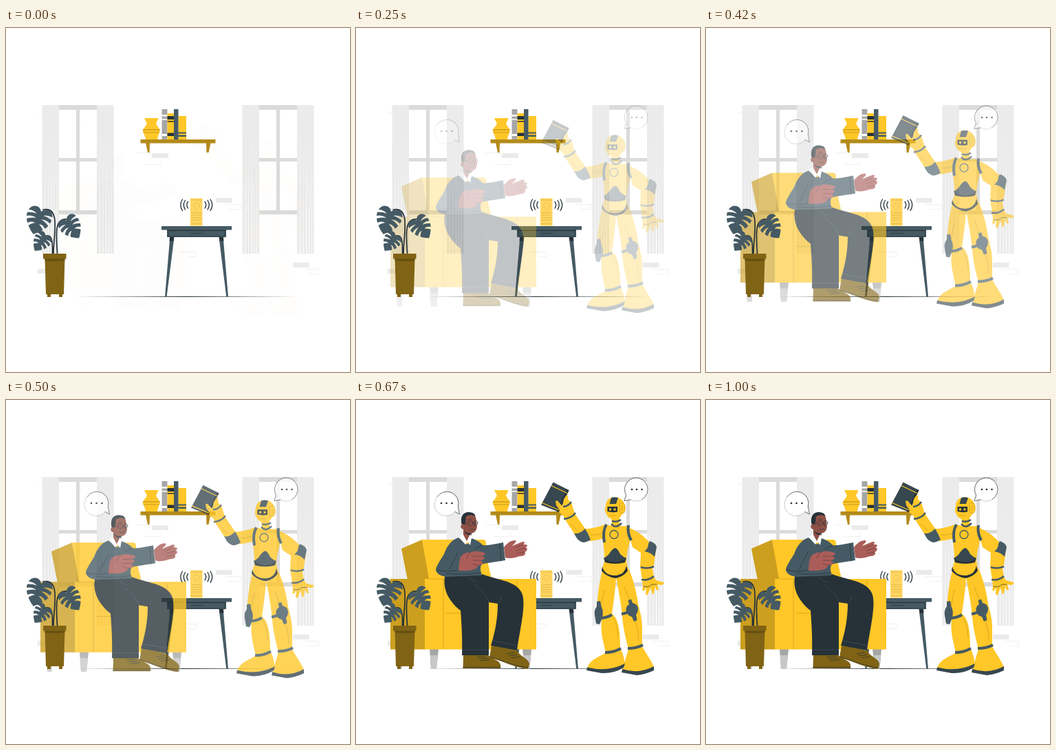
An HTML page that plays this animation: 500 by 500 pixels, repeating every 1.04 s.

```html
<!DOCTYPE html>
<html lang="en">
<head>
<meta charset="utf-8">
<title>Living room</title>
<style>
html, body { margin: 0; width: 100%; height: 100%; overflow: hidden; background: #fff }
svg { display: block; width: 100vw; height: 100vh }
.y { fill: #ffc727 } .y2 { fill: #cc9f1f } .y3 { fill: #b38b1b } .y4 { fill: #806314 }
.d { fill: #455a64 } .d2 { fill: #37474f } .k { fill: #263238 } .s { fill: #8f5145 } .s2 { fill: #aa5d59 }
.w { fill: #fff } .g { fill: #dbdbdb } .g2 { fill: #ebebeb } .g3 { fill: #a6a6a6 } .g4 { fill: #c7c7c7 }
.l { fill: none; stroke: #263238; stroke-width: .7; stroke-linecap: round; stroke-linejoin: round }
.f { fill: none; stroke: #ebebeb; stroke-width: .7 }
.o { fill: none; stroke: #b38b1b; stroke-width: .5 }
.b { fill: none; stroke: #455a64; stroke-width: 4 }
.b2 { fill: none; stroke: #455a64; stroke-width: 2.5 }
.m { fill: none; stroke: #5d3029; stroke-width: .6; stroke-linecap: round }
</style>
</head>
<body>
<svg viewBox="0 0 500 500">
<defs>
  <g id="curtain">
    <path class="g2" d="M0 0H24.500V216H0Z"/>
    <path class="w" d="M4 216L4.600 30 5 216ZM8.500 216L9 45 9.500 216ZM13 216L13.700 25 14.200 216ZM17 216L17.500 50 18 216ZM20.500 216L21 35 21.400 216Z"/>
  </g>
  <g id="window">
    <path class="g" d="M77 112H132V119H77ZM102 119H107V265H102ZM77 189H132V194H77ZM77 265H132V271H77Z"/>
    <use href="#curtain" x="52.500" y="112"/><use href="#curtain" x="132" y="112"/>
  </g>
  <mask id="slots" maskUnits="userSpaceOnUse" x="-25" y="-15" width="50" height="60">
    <path fill="#fff" d="M-25 -15H25V45H-25Z"/>
    <path d="M-24 5Q-13 0 -5 5Q-13 4 -24 10ZM-24 17Q-12 8 -4 12Q-12 13 -22 22ZM-18 29Q-10 17 -3 20Q-9 22 -14 32ZM24 5Q13 0 5 5Q13 4 24 10ZM24 17Q12 8 4 12Q12 13 22 22ZM18 29Q10 17 3 20Q9 22 14 32Z"/>
  </mask>
  <g id="leaf" mask="url(#slots)">
    <path class="d" d="M0 0C-4 -10 -18 -8 -19 6C-20 20 -8 32 0 38C10 30 20 20 19 5C18 -8 5 -9 0 0Z"/>
  </g>
</defs>

<!-- room -->
<use href="#window"/><use href="#window" x="291"/>
<path class="g2" d="M212 182h24v7h-24zM305 247h23.500v7h-23.500zM417 341h23.500v7h-23.500zM46 350h24v7h-24z"/>
<path class="f" d="M188 181.500h21v6M200 198.500h24v-6M318 256.500h24v7h-18M431 350.500h23.500v7h-15M252 325.500h24.500v7h-12M47 122.500h6"/>
<path class="k" d="M100 390.500Q262 389.700 424 390.500Q262 391.400 100 390.500Z"/>

<!-- shelf -->
<path class="y3" d="M195.500 162H304.500V167.500H195.500ZM203 167H209L208.500 181H206ZM291 167H297.500L294.500 181H291.500Z"/>
<path class="y" d="M201 131H221.500C220 136 217.500 138 218.500 140L224 148.500C223 153 220.500 157 220 162H203C202.500 157 199.500 153 198.500 148.500L204.500 140C205.500 138 203 136 201 131Z"/>
<path class="y3" d="M199 147.500H224V148.500H199ZM199.500 151.500H223V152.300H199.500Z"/>
<path class="g3" d="M226.500 118H234.500V162H226.500Z"/>
<path class="w" d="M226.500 126H234.500V128.500H226.500ZM226.500 132H234.500V133.500H226.500ZM226.500 154H234.500V157H226.500Z"/>
<path class="y" d="M234.500 124H244V162H234.500ZM250.500 128H262V162H250.500Z"/>
<path class="k" d="M234.500 128H244V133H234.500ZM234.500 135H244V136.500H234.500ZM234.500 152.500H244V157H234.500Z"/>
<path class="d" d="M244 118H250.500V162H244ZM250.500 151.500H262V153.500H250.500ZM250.500 155.500H262V158H250.500Z"/>

<!-- table and speaker -->
<path class="d" d="M226 288H328V293.500H226ZM234 294H320V304H234ZM238 308H244L233.500 391H231ZM310 308H316L323 391H320.300Z"/>
<path class="k" d="M234 293.200H320V295H234ZM238 304H244.500L243.500 309.500H237.500ZM309.500 304H316L316.500 309.500H310.500Z"/>
<path class="l" d="M236 296V303H318V296M269 298.500H286"/>
<path fill="#ffd561" d="M268 247.500H285.500V287.500H268Z"/>
<g class="o" opacity=".65"><path d="M268 250H285.500M268 284.500H285.500"/><circle cx="276.800" cy="258.500" r="4.300" stroke-dasharray="1 .6"/>
<path style="stroke-width:1.200" stroke-dasharray="1.200 1.200" d="M270 268.500H284M270 272H284M270 275.500H284M270 279H284"/></g>
<g class="l" style="stroke-width:1.300"><path d="M264.500 252.500Q261 257 264.500 262M260.500 250.500Q256 257 260.500 264M256.500 249Q251 257 256.500 265.500"/>
<path d="M289 252.500Q292.500 257 289 262M293 250.500Q297.500 257 293 264M297 249Q302.500 257 297 265.500"/></g>

<!-- fading figures -->
<g id="people">
  <!-- armchair -->
  <path class="g3" d="M58 362H68L66.500 390.500H60ZM107 362H120L117 390.500H109ZM242 362H255L252.500 390.500H245Z"/>
  <path class="g4" d="M59 371H67.500L66.500 390.500H60ZM108 371H119L117 390.500H109ZM243 371H254L252.500 390.500H245Z"/>
  <path class="y2" d="M66 216L96 203 108 262H75ZM50 260H102V362.500H50Z"/>
  <path class="y" d="M96 203H186Q189 204 189 208L191 234 197 260H262V362.500H100V260H106Z"/>
  <path class="o" d="M127 261V362M234 261V362M131 310H155M106 260H132"/>

  <!-- man -->
  <path class="y4" d="M156 370H191C196 376 209 378 210 385V390H155.500ZM197 357L234 364C238 373 252 376 252 384L250 391C234 390 214 380 194 374Z"/>
  <path class="l" d="M155.500 388.500H210M194 373C214 379 234 388 250.500 389M176 373L189 373M178 376L192 375.500M181 379L195 377.500M219 369L230 367M222 372L234 370M226 375L238 373"/>
  <path class="k" d="M130 253H183C205 262 235 262 242 283C247 300 238 335 234 364L196 357C203 335 206 315 206 296L193 294V371H154C155 345 153 320 152 306C136 294 124 274 130 253Z"/>
  <path fill="none" stroke="#455a64" stroke-width=".6" d="M206 296C209 293 211 290 211 286M193 294C190 282 180 275 172 268M155 363H193M199 350L236 357M163 257Q168 262 176 265"/>
  <path class="s" d="M154 181C152 176 153 170 157 167H172C175 170 175 177 176 184C175 190 173 193 168 193.500L167 199 161 207 156 198V188C152 187 151 183 154 181Z"/>
  <path class="k" d="M154 182C151 172 154 163.500 163 163C169 163 173 165 173.500 169C168 166 163 167 159.500 169.500C160 174 159 178 157.500 182C156 179 154 180 154 182ZM157 190Q161 194.500 168 193.500L167 196Q160 197 157 190Z"/>
  <g class="l"><circle cx="166" cy="179" r="3.700"/><circle cx="174" cy="178.500" r="2.900"/><path d="M157 179L162.300 179M163.500 173.500L168 173M166 178.500V179.500M173.500 178V179M165 188Q169 189.500 172 187M171 179L172.500 183.500"/></g>
  <path class="d" d="M149 200C139 203 132 212 128 224C121 235 116 243 116 247C117 253 124 256 131 257L183 255C180 247 180 239 185 238L217 233 214 207C203 209 192 212 184 211C180 206 176 204 168 201L162 210Z"/>
  <path class="w" d="M155 194L150 200 159 210 162 206 166 211 168 200 166 195 161 205Z"/>
  <path class="l" d="M148 221C144 231 138 238 136 246M184 211C180 213 176 214 173 216M185 238C181 237 178 235 176 233M118 247C128 250 140 249 150 247M209 208.500L211 234M131 252Q155 255 182 251"/>
  <path class="s2" d="M152 228C157 222 162 221 166 222C172 218 180 220 187 222C189 224 187 227 180 227L186 228C188 231 185 233 180 233L184 235C186 238 183 240 178 240C176 246 168 248 160 248H149C149 240 150 234 152 228ZM215 214C220 208 224 204 232 204C234 207 229 209 227 212L242 206C246 206 246 208 243 210L247 210C250 211 249 213 246 215L248 215C250 217 248 220 245 221L246 222C247 225 243 227 238 227C230 230 222 231 217 229Z"/>
  <path class="m" d="M166 222Q162 225 161 230M180 227H170M180 233H170M178 240Q173 240 170 238M243 210L231 215M246 215L233 219M245 221L234 223"/>

  <!-- robot legs -->
  <path class="y" d="M358 247L378 257C377 278 374 296 372 311C380 316 384 330 384 362L363 367C359 350 355 337 357 318L350 304C351 283 354 264 358 247ZM378 257L396 245C403 260 408 280 410 296C412 306 416 316 416 330V358L396 362C392 347 388 330 387 315C385 292 381 275 378 257Z"/>
  <path class="b" d="M357 317Q366 316 372 312M386 311Q394 310 400 305"/>
  <path class="d" d="M350 293L355 292 356.500 300Q361 309 357 319L354 326 349 325 347.500 316Q345 306 350 300ZM395.500 291L400 289.500 402 295Q409 296 410 303Q410 309 407 312L408.500 320 404 322 401 315Q392 313 392.500 304Q393 299 397 297Z"/>
  <path class="y" d="M363 367L385 363C389 370 391 380 390 386C374 393 356 393 336 390C340 376 354 374 363 367ZM396 362L416 358C421 368 429 378 433 388L409 397 387 393Q392 375 396 362Z"/>
  <path class="d2" d="M336 388.500Q366 396 391 383L389 389Q374 398 357 397L335 393ZM387 391Q411 399 433 387V393Q420 399 408 400L386 396Z"/>
  <path class="b" d="M362 367Q375 367 385 361M395 361Q408 361 417 356"/>
  <path class="o" d="M372 315Q380 324 381 345M361 276L356 300M390 272L398 292M406 320Q411 335 411 350"/>

  <!-- robot torso -->
  <path class="y" d="M361 181Q377 184 395 183L400 195C397 212 393 222 393 235L396 247 383 256H371L357 247 361 235C362 220 358 205 358 195Z"/>
  <path class="k" d="M360 229Q377 241 393 229L391 236Q377 240 362 236ZM358 242Q361 254 374 255H379Q391 253 393 241L395 248Q391 254 384 257L378 259 372 258Q361 254 357 248Z"/>
  <path class="d2" d="M377 215Q381 217 384 224Q388 228 393 230Q377 241 360 230Q367 226 369 222Q373 216 377 215Z"/>
  <circle cx="375" cy="195.500" r="6" class="b" style="stroke-width:1.300"/>
  <path class="y" d="M371 171H383V181Q378 187 372 181Z"/>
  <path class="b2" d="M372 176Q380 178 385 174M371 180Q377 188 386 179"/>

  <!-- robot head -->
  <path class="y" d="M363 154C363 145 369 141.500 376 141.500C385 141.500 391 147 391 157Q391 164 386 167C384 172 379 174.500 375 174.500Q366 172 364 166Q360 160 363 154Z"/>
  <path class="d2" d="M371 142Q376 140.500 381 142L378 151H368.500Z"/>
  <path class="k" d="M365.500 155H380V162.500Q372 164 365.500 162Z"/>
  <path class="y" d="M368 157.500h3v3h-3zM374.500 157.500h3v3h-3z"/>
  <ellipse cx="387" cy="157" rx="4.700" ry="7" class="y"/>
  <path class="o" d="M383 151Q387 147 391 152V163Q386 167 383 162ZM387 153V161M368 168H378"/>

  <!-- raised arm with book -->
  <path class="d2" d="M286.500 119.500L309.500 131 295 163 269 152.500Z"/>
  <path class="k" d="M309.500 131L295 163 292 162 306 130Z"/>
  <path class="o" style="stroke:#ffc727;stroke-width:1.100" d="M270.500 149.500L295 160M284 124.500L307 135.500"/>
  <path class="y" d="M300 154L313 149 318 165 333 187Q342 188 362 181L361 201Q343 206 328 205L317 194 302 171Z"/>
  <path class="y" d="M290 147Q293 145 295 149L300 154 302 144 306 138Q309 138 308 144L312 149 314 162 301 168 295 163 296 160 291 153Z"/>
  <path class="d" d="M317 194Q326 195 333 187Q338 195 341 203Q335 207 330 207Q324 205 321 201Z"/>
  <path class="b2" d="M302 173Q313 172 319 164M301 155Q308 155 313 148"/>
  <path class="b" d="M364 181Q358 190 361 207"/>
  <path class="o" d="M312 180Q317 185 322 190M341 196Q350 197 358 194M291 148L297 157"/>

  <!-- lowered arm -->
  <path class="y" d="M397 186C408 190 416 196 426 206L436 218 433 239 431 246 433 257 436 262 447 265Q449 267 444 269L438 268 440 276Q439 278 436 275L435 270 433 281Q430 284 430 279L428 273 424 283Q421 285 421 280L422 273 418 278Q415 277 417 272L416 261 413 243 414 222 402 214Q398 202 397 186Z"/>
  <path class="d" d="M427 205Q436 208 437 214L434 228Q428 221 419 220Q425 216 425 209Z"/>
  <path class="b" d="M396 182Q394 193 400 204"/>
  <path class="b2" d="M414 243Q424 246 433 242M415 261Q425 263 433 256"/>
  <path class="l" d="M418 271Q426 273 430 268L437 268"/>
</g>

<!-- speech bubbles -->
<g id="talk">
  <path class="w" d="M145 161.500L150.500 166 148.300 155A17 17 0 1 0 145 161.500ZM394.500 141L390 146.500 399 145A17 17 0 1 0 394.500 141Z"/>
  <path class="l" d="M118 140.500A17 17 0 0 1 148.300 155L150.500 166 144 162.500M416 144.500A17 17 0 0 0 407 113A17 17 0 0 0 392.500 138L390 146.500 399 145"/>
  <path class="l" style="stroke-width:.25" d="M118 140.500A17 17 0 0 0 144 162.500M399 145A17 17 0 0 0 416 144.500"/>
  <path class="l" style="stroke-width:2.700" d="M124 150h.01M131.500 150h.01M139.500 150h.01M401 130h.01M408 130h.01M415.500 130h.01"/>
</g>

<!-- plant -->
<path class="l" style="stroke-width:1.700" d="M69 328C69 300 80 259 54 264M74.500 328C73 300 70 277 88 278M67.500 328C68 308 67 298 55 303"/>
<use href="#leaf" transform="translate(51 267) rotate(19) scale(.98 .91)"/>
<use href="#leaf" transform="translate(88 280) rotate(-36) scale(.82)"/>
<use href="#leaf" transform="translate(57 303) rotate(36) scale(.68)"/>
<path class="y4" d="M54 328H87.500V335.500H54ZM56.500 335H85.500L84 387H58ZM60 386H65V391H60ZM77 386H82V391H77Z"/>
<path fill="#665010" d="M56.500 335.500H85.500V338Q70 340 56.600 338Z"/>
</svg>
<script>
const LOOP = 1040, STEPS = 25, RISE = 20;
const people = document.getElementById('people'), talk = document.getElementById('talk');
const cubic = (a, b, s) => 3 * a * s * (1 - s) ** 2 + 3 * b * s * s * (1 - s) + s ** 3;

// Cubic-bezier easing with a slight overshoot, solved by bisection
function ease(x) {
  let lo = 0, hi = 1;
  for (let i = 0; i < 30; i++) {
    const mid = (lo + hi) / 2;
    if (cubic(.36, .5, mid) < x) lo = mid; else hi = mid;
  }
  return cubic(-.01, 1.38, lo);
}

const start = performance.now();
function draw() {
  const t = (performance.now() - start) % LOOP;
  const step = Math.min(STEPS - 1, Math.floor((t + 4) / LOOP * STEPS));
  const e = ease((step + 1) / STEPS);
  const alpha = Math.max(0, Math.min(1, e));
  people.setAttribute('opacity', alpha);
  talk.setAttribute('opacity', alpha);
  people.setAttribute('transform', `translate(0 ${RISE * (1 - e)})`);
  requestAnimationFrame(draw);
}
draw();
</script>
</body>
</html>
```
